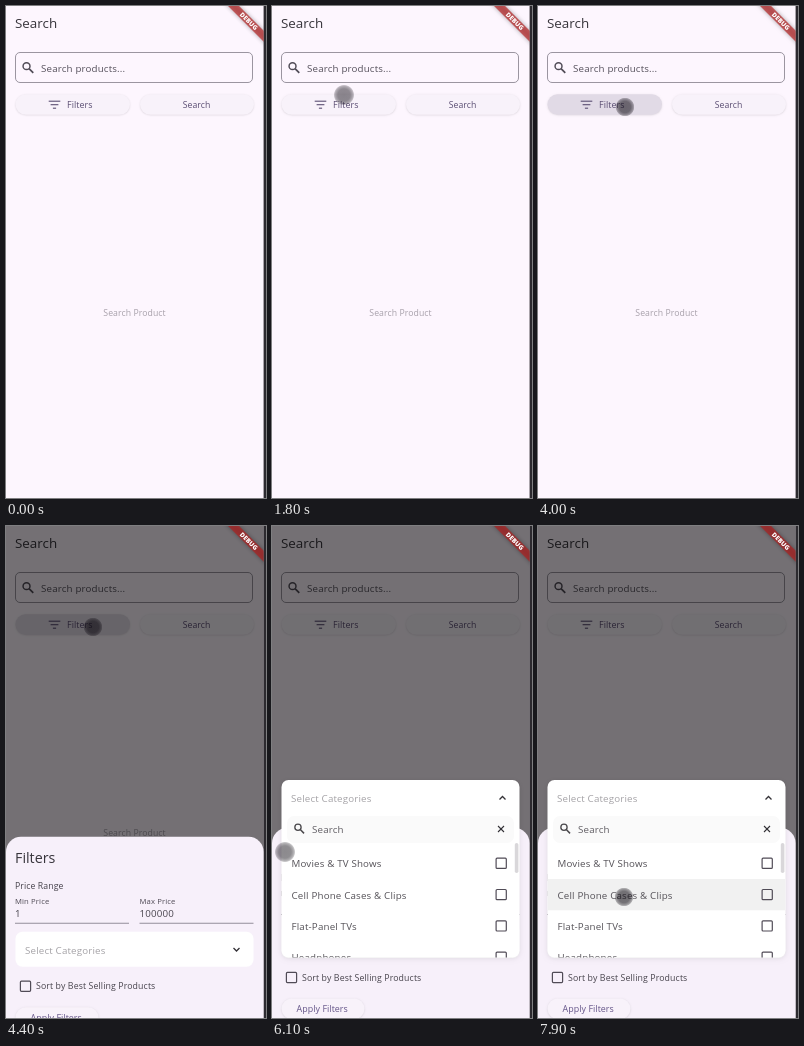
An HTML page with a canvas for the animation above (8000 ms loop, 260 by 492 pixels).

```html
<!DOCTYPE html>
<html lang="en">
<head>
<meta charset="utf-8">
<title>Product search</title>
<style>
  html, body { margin: 0; width: 100%; height: 100%; overflow: hidden; background: #fdf6fe; }
  canvas { display: block; width: 260px; height: 492px; }
</style>
</head>
<body>
<canvas id="stage"></canvas>
<script>
const W = 260, H = 492, EDGE = 257.6, LOOP = 8000, STEP = 100;
const INK = '#504b56', GREY = '#a4a2a6', PURPLE = '#5a4d72';
const BODY = 9.75, BODY_GAP = 0.17;
const canvas = document.getElementById('stage');
const ctx = canvas.getContext('2d');
const dpr = window.devicePixelRatio || 1;
canvas.width = W * dpr;
canvas.height = H * dpr;

const clamp = v => Math.max(0, Math.min(1, v));
const mix = (a, b, p) => a + (b - a) * p;
const progress = (t, start, length) => clamp((t - start) / length);
const smooth = p => p * p * (3 - 2 * p);
const easeOut = p => 1 - Math.pow(1 - p, 2.2);

// Pointer path: time, x, y
const path = [
  [0, 275, 262], [900, 138, 168], [1500, 74, 92], [1800, 72, 89],
  [2300, 69, 86], [2900, 65, 82], [3300, 72, 84], [3600, 85, 91],
  [3800, 87, 101], [4400, 87, 101], [5000, 60, 418], [5100, 59, 421],
  [5300, 62, 418], [5600, 62, 418], [6000, 18, 330], [6100, 13, 326],
  [6400, 38, 338], [7000, 88, 362], [7300, 97, 370], [7600, 86, 371], [8000, 86, 371]
];
const presses = [[4000, 4400], [5500, 5600], [7900, 8000]];

function pointerAt(t) {
  const i = path.findIndex((k, n) => n > 0 && t <= k[0]);
  const a = path[i - 1], b = path[i];
  const p = smooth((t - a[0]) / (b[0] - a[0]));
  return [mix(a[1], b[1], p), mix(a[2], b[2], p)];
}

function text(str, x, y, size, color, { gap = 0, weight = 400, align = 'left' } = {}) {
  ctx.font = `${weight} ${size}px "Open Sans", "Noto Sans", sans-serif`;
  ctx.letterSpacing = gap + 'px';
  ctx.textAlign = align;
  ctx.fillStyle = color;
  ctx.fillText(str, x, y);
}

const bodyText = (str, x, y, color) => text(str, x, y, BODY, color, { gap: BODY_GAP });

function roundRect(x, y, w, h, r, fill, stroke, width = 1) {
  ctx.beginPath();
  ctx.roundRect(x, y, w, h, r);
  if (fill) { ctx.fillStyle = fill; ctx.fill(); }
  if (stroke) { ctx.strokeStyle = stroke; ctx.lineWidth = width; ctx.stroke(); }
}

function line(points, color, width) {
  ctx.beginPath();
  points.forEach(([x, y]) => ctx.lineTo(x, y));
  ctx.strokeStyle = color;
  ctx.lineWidth = width;
  ctx.stroke();
}

function withShadow(blur, dy, alpha, draw) {
  ctx.save();
  ctx.shadowColor = `rgba(0,0,0,${alpha})`;
  ctx.shadowBlur = blur * dpr;
  ctx.shadowOffsetY = dy * dpr;
  draw();
  ctx.restore();
}

function searchIcon(x, y, s, color) {
  ctx.beginPath();
  ctx.arc(x - 1.4 * s, y - 1.4 * s, 3.3 * s, 0, 7);
  ctx.strokeStyle = color;
  ctx.lineWidth = 1.4 * s;
  ctx.stroke();
  line([[x + s, y + s], [x + 5 * s, y + 5 * s]], color, 1.6 * s);
}

function chevron(x, y, dir) {
  line([[x - 3, y - 1.5 * dir], [x, y + 1.5 * dir], [x + 3, y - 1.5 * dir]], '#333136', 1.3);
}

function checkbox(x, y) {
  roundRect(x - 5.1, y - 5.1, 10.2, 10.2, 1, null, INK, 1.2);
}

function button(x, y, w) {
  withShadow(2, 0.6, 0.13, () => roundRect(x, y, w, 20.5, 10.2, '#f8f2fa'));
}

function page(t) {
  ctx.fillStyle = '#fdf6fe';
  ctx.fillRect(0, 0, EDGE, H);
  text('Search', 9, 22, 13.4, '#37343b');
  roundRect(9.5, 46.5, 237, 30, 4.5, null, '#908b96', 0.9);
  searchIcon(22, 61.6, 1.05, INK);
  bodyText('Search products...', 35, 66, '#55505b');

  button(9.5, 88.2, 114.5);
  const press = progress(t, 3900, 100) * (1 - progress(t, 4500, 300));
  if (press > 0) roundRect(9.5, 88.2, 114.5, 20.5, 10.2, `rgba(70,58,95,${0.13 * press})`);
  [[5.8, 95.2], [3.9, 98.7], [1.6, 102.2]].forEach(([half, y]) =>
    line([[48.5 - half, y], [48.5 + half, y]], PURPLE, 1.1));
  text('Filters', 61, 102.2, 8.9, PURPLE, { gap: 0.06, weight: 500 });
  button(134, 88.2, 114);
  text('Search', 190.5, 102.2, 8.7, PURPLE, { gap: 0.06, weight: 500, align: 'center' });
  text('Search Product', 128.5, 310, 8.7, '#a7a0aa', { gap: 0.08, align: 'center' });
}

function numberField(x, label, value) {
  text(label, x, 67.5, 7.7, INK, { gap: 0.12 });
  bodyText(value, x, 80, '#48444d');
  line([[x, 86.5], [x + 114, 86.5]], '#8a8490', 0.9);
}

function sheet(t) {
  const fade = progress(t, 4150, 200);
  if (!fade) return;
  ctx.fillStyle = `rgba(0,0,0,${0.54 * fade})`;
  ctx.fillRect(0, 0, EDGE, H);

  const top = mix(H, 302, easeOut(progress(t, 4150, 332)));
  ctx.save();
  ctx.translate(0, top);
  roundRect(0, 0, EDGE, H, [15, 15, 0, 0], '#f7f0fa');
  text('Filters', 9, 26.7, 14.3, '#37343b');
  text('Price Range', 9, 52.5, 8.7, '#45414a', { gap: 0.1 });
  numberField(9, 'Min Price', '1');
  numberField(133.5, 'Max Price', '100000');
  roundRect(9.5, 95, 238, 35, 7, '#fff');
  bodyText('Select Categories', 19, 116.8, GREY);
  chevron(230.5, 112.8, 1);
  checkbox(19.5, 149.5);
  text('Sort by Best Selling Products', 30, 152.6, 8.75, '#48444d', { gap: 0.12 });
  button(9.5, 170.5, 83);
  text('Apply Filters', 24.5, 184.2, 8.9, '#645488', { gap: 0.06, weight: 500 });
  ctx.restore();
}

function dropdown(t) {
  const open = smooth(progress(t, 5550, 300));
  if (!open) return;
  const top = mix(397, 254, open), bottom = 431.5;
  withShadow(5, 1, 0.1, () => roundRect(9.5, top, 238, bottom - top, 7, '#fff'));
  ctx.save();
  ctx.beginPath();
  ctx.roundRect(9.5, top, 238, bottom - top, 7);
  ctx.clip();
  ctx.translate(0, top - 254);
  bodyText('Select Categories', 19, 275.8, GREY);
  chevron(230.5, 272, -1);
  roundRect(15, 290, 227, 27, 7, '#fafafa');
  searchIcon(27.3, 302.6, 0.95, '#4b494d');
  bodyText('Search', 40, 306.6, '#5f5c62');
  line([[226, 300], [232, 306]], '#333136', 1.1);
  line([[232, 300], [226, 306]], '#333136', 1.1);

  if (t >= 7900) {
    ctx.fillStyle = '#f1f1f1';
    ctx.fillRect(9.5, 353, 238, 31.3);
  }
  ['Movies & TV Shows', 'Cell Phone Cases & Clips', 'Flat-Panel TVs', 'Headphones'].forEach((name, i) => {
    const y = 337.3 + i * 31.3;
    bodyText(name, 19.5, y + 4, '#545157');
    checkbox(229.2, y);
  });
  roundRect(242.8, 317, 3.6, 30, 1.8, '#d9d7da');
  ctx.restore();
}

function pointer(t) {
  if (t < STEP) return;
  const [x, y] = pointerAt(t);
  const pressed = presses.some(([from, to]) => t >= from && t <= to);
  const r = pressed ? 9.5 : 10.3;
  const core = pressed ? 0.56 : 0.47;
  const glow = ctx.createRadialGradient(x, y, 0, x, y, r);
  [[0, 1], [0.6, 0.97], [0.82, 0.7], [0.92, 0.5], [1, 0]].forEach(([stop, share]) =>
    glow.addColorStop(stop, `rgba(10,6,14,${core * share})`));
  ctx.fillStyle = glow;
  ctx.fillRect(x - r, y - r, 2 * r, 2 * r);
}

function banner() {
  ctx.save();
  ctx.beginPath();
  ctx.rect(0, 0, EDGE, H);
  ctx.clip();
  ctx.translate(258, 0);
  ctx.rotate(Math.PI / 4);
  withShadow(4, 0, 0.5, () => {
    ctx.fillStyle = 'rgba(183,28,28,0.66)';
    ctx.fillRect(-40, 17.6, 80, 7.8);
  });
  text('DEBUG', 0, 23.8, 6.4, '#fff', { weight: 800, align: 'center' });
  ctx.restore();
}

function draw(now) {
  const t = Math.floor((now % LOOP) / STEP) * STEP;
  ctx.setTransform(dpr, 0, 0, dpr, 0, 0);
  ctx.fillStyle = '#2c2a2f';
  ctx.fillRect(0, 0, W, H);
  page(t);
  sheet(t);
  dropdown(t);
  banner();
  pointer(t);
  ctx.fillStyle = '#2c2a2f';
  ctx.fillRect(258, 0, W - 258, H);
}

const start = performance.now();
function tick() {
  draw(performance.now() - start);
  requestAnimationFrame(tick);
}
tick();
</script>
</body>
</html>
```
